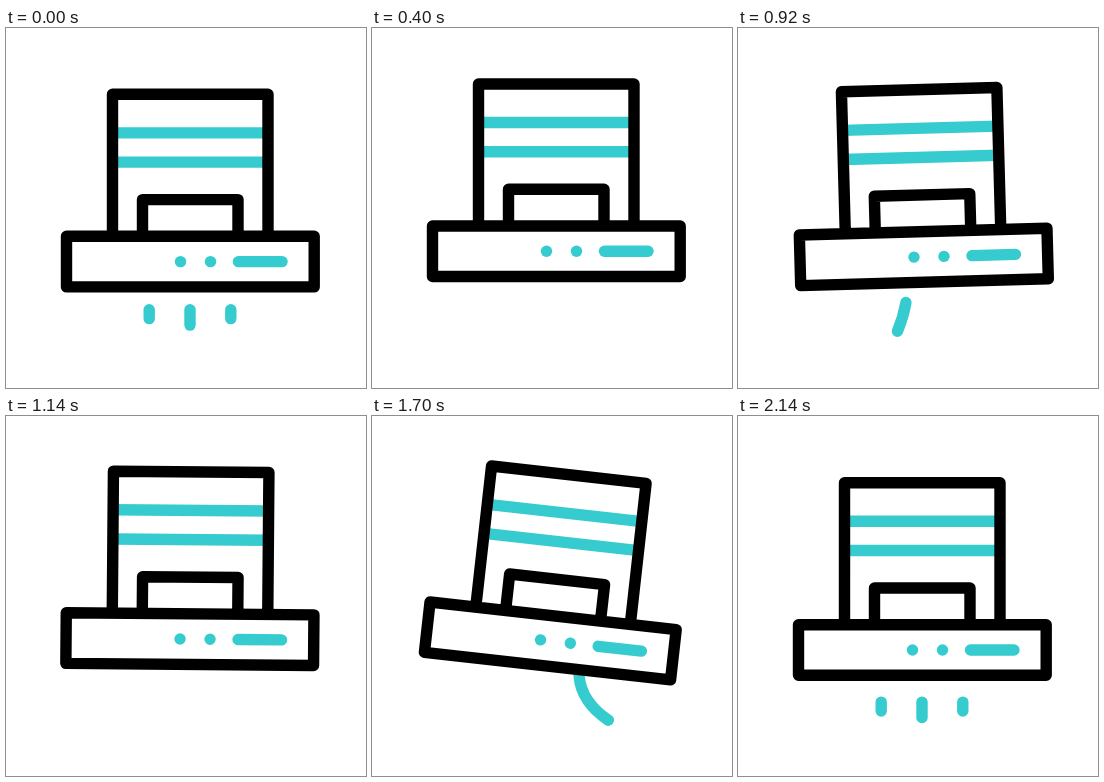
An HTML page that plays this animation: 360x360 px, repeating every 2160 ms.

```html
<!DOCTYPE html>
<html lang="en">
<head>
<meta charset="utf-8">
<title>Cooker hood</title>
<style>
  html, body { margin: 0; width: 100%; height: 100%; overflow: hidden; background: #fff; }
  svg { display: block; width: 100vw; height: 100vh; }
  path { fill: none; stroke-width: 11.4; stroke-linejoin: round; }
  .teal { stroke: #36cbce; }
  .ink { stroke: #000; }
  .round { stroke-linecap: round; }
  circle { fill: #36cbce; }
</style>
</head>
<body>
<svg viewBox="0 0 360 360">
  <g id="hood">
    <g id="steam"></g>
    <path class="teal" d="M107 105.3H262M107 134.5H262"/>
    <path class="ink" d="M106.5 208V66.7H262V208M136.5 208V172H232V208M60.5 208.7H308.2V259.3H60.5Z"/>
    <circle cx="174.5" cy="234" r="5.7"/>
    <circle cx="204.5" cy="234" r="5.7"/>
    <path class="teal round" d="M232.5 234H276"/>
  </g>
</svg>
<script>
const LOOP = 2160;
const AXIS = 184;
const hood = document.getElementById('hood');
const steam = document.getElementById('steam');

const clamp = p => Math.min(1, Math.max(0, p));
const ease = p => (1 - Math.cos(Math.PI * clamp(p))) / 2;
const age = (t, start) => (t - start + LOOP) % LOOP;

// Rises smoothly from 0 to 1 at the peak, then falls back to 0.
function swell(t, start, peak, end) {
  const a = age(t, start);
  const rise = peak - start;
  return a < rise ? ease(a / rise) : 1 - ease((a - rise) / (end - peak));
}

// Paths run from the floor up to the lower edge of the hood.
const outer = side => `M${AXIS + side * 149} 324C${AXIS + side * 86} 322 ${AXIS + side * 35} 302 ${AXIS + side * 32} 259`;
const inner = side => `M${AXIS + side * 46} 335C${AXIS + side * 30} 318 ${AXIS + side * 18} 290 ${AXIS + side * 16} 259`;
const column = side => `M${AXIS + side * 40.8} 340V259`;

// The tail follows the head, behind it by `length`, a share of the path.
function makePuff(d, start, duration, length) {
  const path = document.createElementNS('http://www.w3.org/2000/svg', 'path');
  path.setAttribute('d', d);
  path.setAttribute('pathLength', 1);
  path.setAttribute('class', 'teal round');
  steam.append(path);
  return t => {
    const progress = age(t, start) / duration;
    const head = clamp(progress);
    const tail = clamp(progress - length);
    path.style.display = head > 0 && tail < 1 ? '' : 'none';
    path.style.strokeDasharray = `${Math.max(head - tail, 0.001)} 3`;
    path.style.strokeDashoffset = -tail;
  };
}

const puffs = [
  makePuff(outer(-1), 496, 260, 0.01),
  makePuff(inner(-1), 785, 180, 0.36),
  makePuff(inner(1), 1180, 180, 0.36),
  makePuff(outer(1), 1260, 460, 0.38),
  ...[-1, 0, 1].map(side => makePuff(column(side), 1875, 400, side ? 0.11 : 0.19))
];

function draw(t) {
  const lift = 20 * swell(t, -20, 220, 600) + 14.3 * swell(t, 600, 1400, 2140);
  const tilt = 6.4 * swell(t, 825, 1720, 2120) - 1.8 * swell(t, 560, 825, 1720);
  hood.setAttribute('transform', `translate(0 ${-lift}) rotate(${tilt} 180 180)`);
  puffs.forEach(drawPuff => drawPuff(t));
}

function tick() {
  draw(performance.now() % LOOP);
  requestAnimationFrame(tick);
}
draw(0);
requestAnimationFrame(tick);
</script>
</body>
</html>
```
